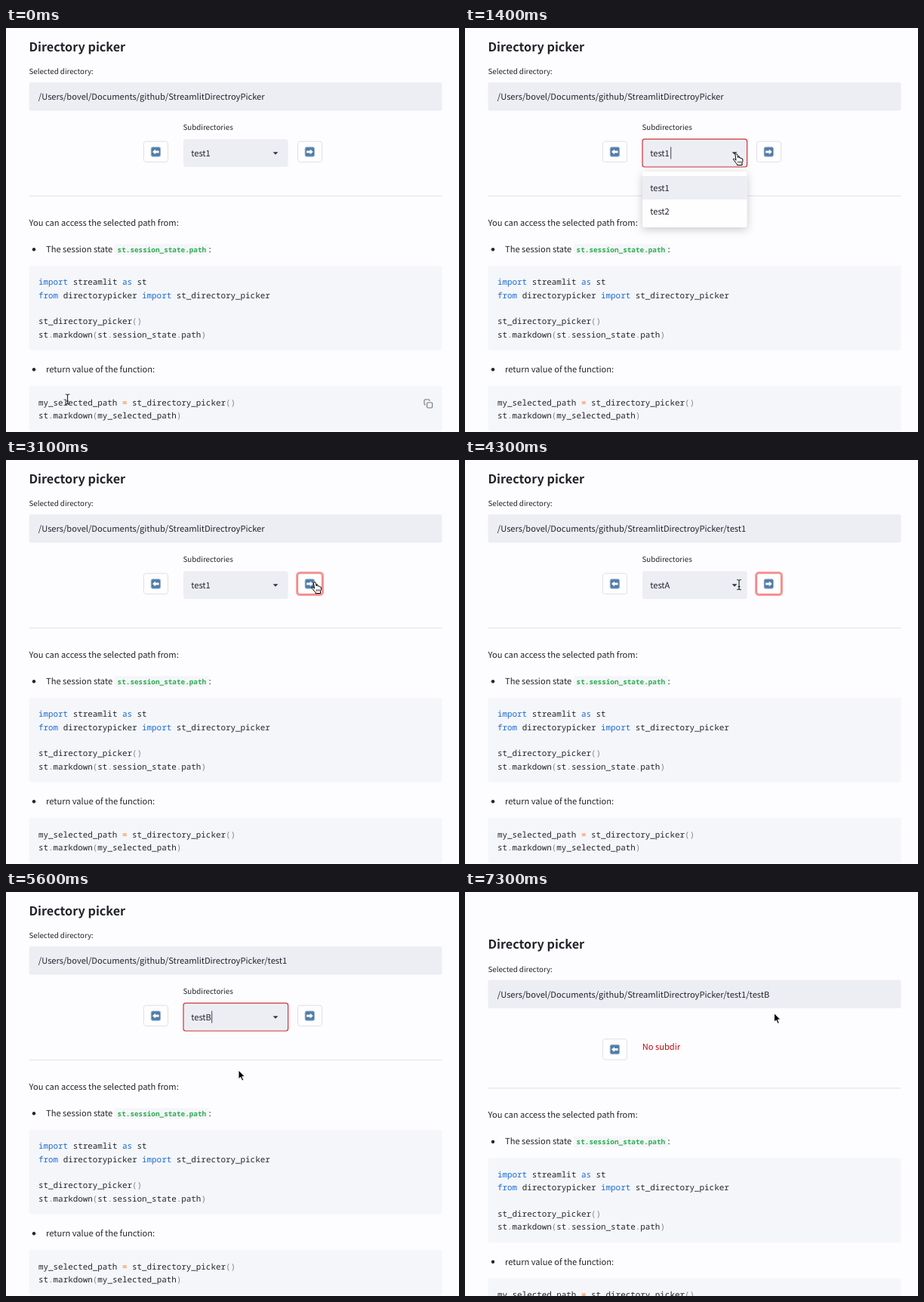
An HTML page for the animation above (8 s loop, 600x535 px).

```html
<!DOCTYPE html>
<html lang="en">
<head>
<meta charset="utf-8">
<title>Directory picker</title>
<style>
  html, body { margin: 0; width: 100%; height: 100%; overflow: hidden; background: #fdfcfe; }
  svg { display: block; }
  text {
    font: 11.13px "Noto Sans CJK SC", "Noto Sans CJK JP", "Noto Sans", sans-serif;
    fill: #22242d;
    text-rendering: geometricPrecision;
    white-space: pre;
  }
  .title { font-size: 16.2px; font-weight: 700; }
  .label { font-size: 9.74px; }
  .code text, .inline { font-family: "Noto Sans Mono", monospace; font-size: 10.88px; }
  .inline { font-size: 9.33px; font-weight: 600; fill: #2fab50; }
  .field { fill: #edeef3; }
  .block { fill: #f4f6f9; }
  .button { fill: #fefefe; stroke: #dddde4; stroke-width: .9; }
  .hover { stroke: #f4696b; }
  .key { fill: #1a6ad6; }
  .op { fill: #ff6a1f; }
  .dim { fill: #84868e; }
  .error { fill: #bd0a10; }
  .option { fill: none; }
  .option.active { fill: #edeef3; }
</style>
</head>
<body>
<svg width="600" height="535" viewBox="0 0 600 535">
  <defs>
    <g id="arrowIcon">
      <rect x="-6.2" y="-6.2" width="12.4" height="12.4" rx="2" fill="#507ca8" stroke="#a3b8cf" stroke-width=".9"/>
      <path d="M-4.4 0L-.5-3.6V-1.4H4.2V1.4H-.5V3.6Z" fill="#fff"/>
    </g>
  </defs>

  <g id="picker">
    <text class="title" x="30.5" y="30.5">Directory picker</text>
    <text class="label" x="30.5" y="61">Selected directory:</text>
    <rect class="field" x="30.5" y="72" width="547" height="37.5" rx="3"/>
    <text id="path" x="42.8" y="95"></text>
    <rect class="button" x="182.5" y="150.2" width="32" height="27.3" rx="3"/>
    <use href="#arrowIcon" x="198.4" y="164"/>
    <text id="empty" class="error" x="234.7" y="164.6">No subdir</text>
    <g id="chooser">
      <text class="label" x="234.5" y="135.4">Subdirectories</text>
      <rect id="select" class="field" x="235" y="147.2" width="138.6" height="36.8" rx="3"/>
      <text id="value" x="245.2" y="169.6"></text>
      <path id="caret" d="M272.7 157.5V173.5" stroke="#31333f" stroke-width=".9"/>
      <path d="M353.6 164.2H360.4L357 167.8Z" fill="#31333f"/>
      <rect id="ring" x="385.3" y="149" width="34.4" height="29.7" rx="4" fill="none" stroke="#f79a9b" stroke-width="2.6"/>
      <rect id="next" class="button" x="386.5" y="150.2" width="32" height="27.3" rx="3"/>
      <use href="#arrowIcon" transform="translate(402.3 164) scale(-1 1)"/>
    </g>
  </g>

  <g id="docs">
    <path d="M30.5 222.3H577.5" stroke="#e2e2e7"/>
    <text x="30.5" y="261.6">You can access the selected path from:</text>
    <circle cx="37" cy="293.3" r="2.2" fill="#22242d"/>
    <text x="53" y="296.8">The session state</text>
    <rect class="block" x="144" y="286" width="125" height="14.5" rx="2"/>
    <text class="inline" x="147.6" y="296.8">st.session_state.path</text>
    <text x="268.4" y="296.8">:</text>
    <rect class="block" x="30.5" y="315" width="547" height="111.5" rx="3"/>
    <g class="code">
      <text x="43" y="340.2"><tspan class="key">import</tspan> streamlit <tspan class="key">as</tspan> st</text>
      <text x="43" y="357.6"><tspan class="key">from</tspan> directorypicker <tspan class="key">import</tspan> st_directory_picker</text>
      <text x="43" y="392.4">st_directory_picker<tspan class="dim">()</tspan></text>
      <text x="43" y="409.8">st<tspan class="dim">.</tspan>markdown<tspan class="dim">(</tspan>st<tspan class="dim">.</tspan>session_state<tspan class="dim">.</tspan>path<tspan class="dim">)</tspan></text>
    </g>
    <circle cx="37" cy="452.3" r="2.2" fill="#22242d"/>
    <text x="53" y="456">return value of the function:</text>
    <rect class="block" x="30.5" y="474" width="547" height="59.5" rx="3"/>
    <g class="code">
      <text x="43" y="499.6">my_selected_path <tspan class="op">=</tspan> st_directory_picker<tspan class="dim">()</tspan></text>
      <text x="43" y="517">st<tspan class="dim">.</tspan>markdown<tspan class="dim">(</tspan>my_selected_path<tspan class="dim">)</tspan></text>
    </g>
    <g id="copy" fill="none" stroke="#72747d" stroke-width="1.1">
      <rect x="557.6" y="22" width="7" height="7" rx="1.2"/>
      <path d="M556 25H555.2Q554 25 554 23.8V19.2Q554 18 555.2 18H559.8Q561 18 561 19.2V20"/>
    </g>
  </g>

  <g id="menu">
    <rect x="235" y="190" width="138.6" height="74" rx="3" fill="#fefefe" style="filter:drop-shadow(0 3px 6px #0003)"/>
    <rect class="option" x="235" y="196" width="138.6" height="31"/>
    <rect class="option" x="235" y="227" width="138.6" height="31"/>
    <text class="choice" x="245.2" y="215.5"></text>
    <text class="choice" x="245.2" y="246.5"></text>
  </g>

  <g id="cursor" stroke-linejoin="round">
    <path id="arrow" d="M0 0V11.6L2.7 9.2L4.7 13.8L6.7 12.9L4.7 8.5H8.3Z" fill="#000" stroke="#fff" stroke-width=".9"/>
    <g id="hand" fill="#fff" stroke="#000" stroke-width="1" transform="translate(.6 0)">
      <path d="M-1.6 1.2Q-1.5-.2-.2-.2Q1.1-.2 1.3 1.2L2 4.8Q3-.1 4.1 5.2Q5.6 4.2 6.1 5.8Q7.8 5.2 8.3 7Q8.6 9.5 7.4 11.6V14.6H.8V13.3Q-1.6 11-2.5 9.1Q-4.8 7.4-4.3 6.5Q-3.2 5.6-1.8 7.2L-.6 8.2Z"/>
      <path d="M2.2 9.2V12M4.1 9.2V12M6 9.2V12" stroke-width=".7"/>
    </g>
    <path id="beam" d="M-2.8-6.5Q0-6.5 0-5Q0-6.5 2.8-6.5M0-5V5.2M-2.8 6.7Q0 6.7 0 5.2Q0 6.7 2.8 6.7M-1.4 2.6H1.4" fill="none" stroke="#222" stroke-width="1.1"/>
  </g>
</svg>

<script>
const LOOP = 8000, STEP = 100;
const ROOT = '/Users/bovel/Documents/github/StreamlitDirectroyPicker';
const $ = id => document.getElementById(id);
const show = (id, on) => { $(id).style.display = on ? '' : 'none'; };
const between = (v, a, b) => v >= a && v < b;

// Cursor stops: time, x, y
const stops = [
  [0, 81.5, 491.5], [900, 359, 167], [1500, 359, 167], [1800, 330, 209],
  [2200, 330, 209], [2800, 408.5, 162], [3500, 408.5, 162], [4300, 363, 165],
  [4400, 359, 167], [4900, 359, 167], [5300, 308, 236], [5800, 308, 236],
  [6500, 408.5, 161], [7100, 409.5, 160.5], [LOOP, 409.5, 160.5]
];

function cursorAt(t) {
  const i = stops.findIndex(s => s[0] > t);
  const [t0, x0, y0] = stops[i - 1], [t1, x1, y1] = stops[i];
  const u = (t - t0) / (t1 - t0), e = u * u * (3 - 2 * u);
  return [x0 + (x1 - x0) * e, y0 + (y1 - y0) * e];
}

function draw(t) {
  const [x, y] = cursorAt(t);
  const inside = between(t, 3300, 7100), done = t >= 7100;
  const names = inside ? ['testA', 'testB'] : ['test1', 'test2'];
  const open = between(t, 1100, 2000) || between(t, 4600, 5500);
  const focused = between(t, 1100, 2900) || between(t, 4600, 6600);
  const clicked = t < 4000 ? 1100 : 4600;

  $('picker').setAttribute('transform', `translate(0 ${done ? 44.5 : 0})`);
  $('docs').setAttribute('transform', `translate(0 ${done ? 37.5 : 0})`);
  $('path').textContent = ROOT + (done ? '/test1/testB' : inside ? '/test1' : '');
  $('value').textContent = names[inside && t >= 5500 ? 1 : 0];
  show('chooser', !done);
  show('empty', done);
  show('menu', open);
  show('ring', between(t, 2900, 4600) || t >= 6600);
  show('caret', focused && (t - clicked) % 1000 < 500);
  $('select').style.cssText = focused ? 'stroke:#cf3339;stroke-width:1.2' : '';

  document.querySelectorAll('.choice').forEach((el, i) => { el.textContent = names[i]; });
  document.querySelectorAll('.option').forEach((el, i) =>
    el.classList.toggle('active', i === (y > 227 ? 1 : 0)));

  const block = between(y, 315, 426) ? 315 : y >= 474 ? 474 : 0;
  const onNext = !done && between(x, 386, 419) && between(y, 150, 178);
  const onSelect = !done && between(x, 235, 374) && between(y, 147, 184);
  const onMenu = open && between(x, 235, 374) && between(y, 190, 264);
  const beam = block || (onSelect && between(t, 3500, 4400));
  const hand = !beam && (onNext || onSelect || onMenu);

  $('next').classList.toggle('hover', onNext || between(t, 2900, 4600));
  show('copy', block);
  $('copy').setAttribute('transform', `translate(0 ${block})`);
  $('cursor').setAttribute('transform', `translate(${x} ${y})`);
  show('beam', beam);
  show('hand', hand);
  show('arrow', !beam && !hand);
}

function tick() {
  draw(Math.floor(performance.now() % LOOP / STEP) * STEP);
  requestAnimationFrame(tick);
}
tick();
</script>
</body>
</html>
```
